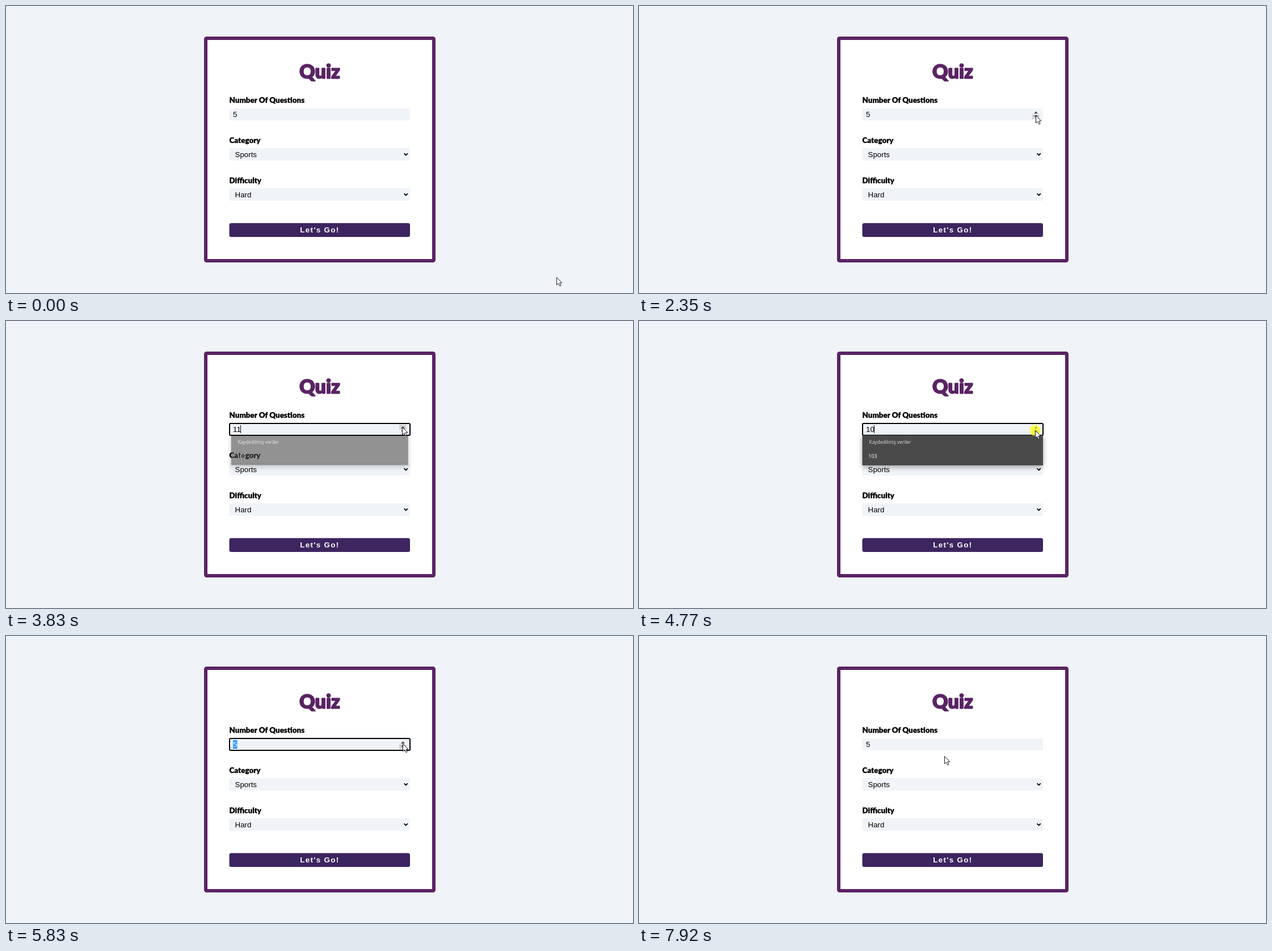
Animation, 1105 px wide and 507 px high, one loop 7990 ms. Source, as an HTML page:

```html
<!DOCTYPE html>
<html lang="en">
<head>
<meta charset="utf-8">
<title>Quiz form</title>
<style>
  html, body { margin: 0; width: 100%; height: 100%; overflow: hidden; background: #f0f4f8; }
  svg { display: block; font: 13.33px "Liberation Sans", Arial, sans-serif; }
  .round { font-family: Lato, sans-serif; font-weight: 900; stroke-linejoin: round; }
  .label { font-size: 13.4px; stroke: #000; stroke-width: .3; }
  .title { font-size: 34px; fill: #5a2364; stroke: #5a2364; stroke-width: 1.6; }
  .field { fill: #f0f4f8; }
  .chevron { fill: none; stroke: #000; stroke-width: 1.8; }
  .go { font-weight: bold; letter-spacing: 1.33px; fill: #fff; }
  #menu { font-family: "Open Sans", "Noto Sans", sans-serif; }
  #menu rect { fill: #4a4a4a; filter: drop-shadow(0 3px 5px rgba(0, 0, 0, .35)); }
</style>
</head>
<body>
<svg width="1105" height="507" viewBox="0 0 1105 507">
  <rect x="352" y="57" width="402" height="393" rx="1.5" fill="#fff" stroke="#5a2364" stroke-width="6"/>
  <text class="round title" x="553" y="127.5" text-anchor="middle">Quiz</text>

  <text class="round label" x="393.5" y="171">Number Of Questions</text>
  <rect class="field" x="393.5" y="181" width="318.5" height="21" rx="3"/>
  <rect id="ring" x="394" y="181" width="318" height="21" rx="2" fill="none" stroke="#000" stroke-width="2"/>
  <rect id="selection" x="400" y="184" width="7.5" height="15" fill="#1e90ff"/>
  <text id="value" x="400" y="196">5</text>
  <rect id="caret" y="184" width="1" height="14"/>

  <g id="spinner" fill="#505050">
    <rect id="hover" x="693" width="12.5" height="8" fill="#d0d0d0"/>
    <path d="M696 190h7l-3.5-4zM696 193.3h7l-3.5 4z"/>
  </g>

  <text class="round label" x="393.5" y="241.5">Category</text>
  <rect class="field" x="393.5" y="251" width="318.5" height="22" rx="3"/>
  <text x="403.5" y="266.5">Sports</text>
  <path class="chevron" d="M701.5 260.3l3.2 3.2 3.2-3.2"/>

  <text class="round label" x="393.5" y="312.5">Difficulty</text>
  <rect class="field" x="393.5" y="322" width="318.5" height="22" rx="3"/>
  <text x="403.5" y="337.5">Hard</text>
  <path class="chevron" d="M701.5 331.3l3.2 3.2 3.2-3.2"/>

  <rect x="393.5" y="383.5" width="318.5" height="24.5" rx="3.5" fill="#3d255f"/>
  <text class="go" x="518.3" y="400">Let's Go!</text>

  <g id="menu">
    <rect x="393.5" y="202" width="318.5" height="53"/>
    <text x="405.5" y="216.5" font-size="8.4" fill="#ddd">Kaydedilmiş veriler</text>
    <text x="404.3" y="242" font-size="9" fill="#fff">103</text>
  </g>

  <circle id="pulse" r="9.8" fill="#ff0" opacity=".65"/>
  <g id="cursor">
    <path id="arrow" d="M.5 .5v13.3l3.1-2.9 2.3 4.9 2.2-1-2.2-4.7h4z" fill="#fff" stroke="#1a1a2a"/>
    <path id="beam" d="M-3-7.5h2l1 1 1-1h2M0-6.5v13M-3 7.5h2l1-1 1 1h2" fill="none" stroke="#000"/>
  </g>
</svg>
<script>
const LOOP = 7990;
const FOCUS = 2960, SELECT = 5500, BLUR = 7860;
const ups = [2960, 3110, 3250, 3400, 3550, 3690];
const downs = [4700, 4830, 4970, 5150, 5290, 5430];
const clicks = [...ups, ...downs, SELECT, 6630, BLUR];
// Opening and closing times of the suggestion list
const menus = [[3550, 3750], [4690, 4830]];
// Pointer path: time, x, y
const path = [
  [600, 970, 479], [760, 925, 440], [1000, 760, 320], [1250, 560, 208], [1380, 514, 189],
  [1560, 450, 230], [1800, 560, 200], [2000, 640, 187], [2210, 692, 189], [2340, 699, 193],
  [2660, 699, 193], [2740, 698, 187], [4660, 698, 187], [4700, 698, 193], [5810, 698, 193],
  [5830, 699, 190], [7060, 699, 190], [7090, 695, 197], [7300, 620, 206], [7560, 533, 210],
  [7710, 538, 212]
];

const $ = id => document.getElementById(id);
const show = (id, on) => { $(id).style.display = on ? "" : "none"; };
const clamp = v => Math.max(0, Math.min(1, v));
const count = (times, t) => times.filter(c => c <= t).length;
const place = (el, x, y) => el.setAttribute("transform", `translate(${x} ${y})`);

function pointer(t) {
  const i = path.findIndex(p => p[0] > t);
  if (i < 0) return path[path.length - 1].slice(1);
  if (i === 0) return path[0].slice(1);
  const a = path[i - 1], b = path[i], k = (t - a[0]) / (b[0] - a[0]);
  return [1, 2].map(n => Math.round(a[n] + (b[n] - a[n]) * k));
}

function drawMenu(t) {
  const open = menus.find(([a, b]) => t >= a && t < b + 200);
  show("menu", open);
  if (!open) return;
  const fade = clamp((t - open[1]) / 200);
  const scale = 1 - .05 * fade;
  $("menu").setAttribute("opacity", Math.min(clamp((t - open[0]) / 70), 1 - fade));
  $("menu").setAttribute("transform", `translate(553 228) scale(${scale}) translate(-553 -228)`);
}

function draw(t) {
  const [x, y] = pointer(t);
  const focused = t >= FOCUS && t < BLUR;
  const selected = t >= SELECT && t < BLUR;
  const inField = x >= 394 && x <= 712 && y >= 181 && y <= 202;
  const onSpinner = inField && x >= 693;

  $("value").textContent = 5 + count(ups, t) - count(downs, t);
  $("value").setAttribute("fill", selected ? "#fff" : "#000");
  show("ring", focused);
  show("selection", selected);
  show("caret", focused && !selected && !(t >= 4300 && t < 4700));
  $("caret").setAttribute("x", Math.floor(400 + $("value").getComputedTextLength() - .3));

  show("spinner", focused || inField);
  show("hover", onSpinner);
  $("hover").setAttribute("y", y < 189 ? 183.5 : 191.5);

  drawMenu(t);

  show("pulse", t < 7920 && clicks.some(c => t >= c && t < c + 125));
  place($("pulse"), x - .2, y + .2);
  place($("cursor"), x, y);
  show("beam", inField && !onSpinner);
  show("arrow", !inField || onSpinner);
}

const start = performance.now();
function tick() {
  draw((performance.now() - start) % LOOP);
  requestAnimationFrame(tick);
}
tick();
</script>
</body>
</html>
```
